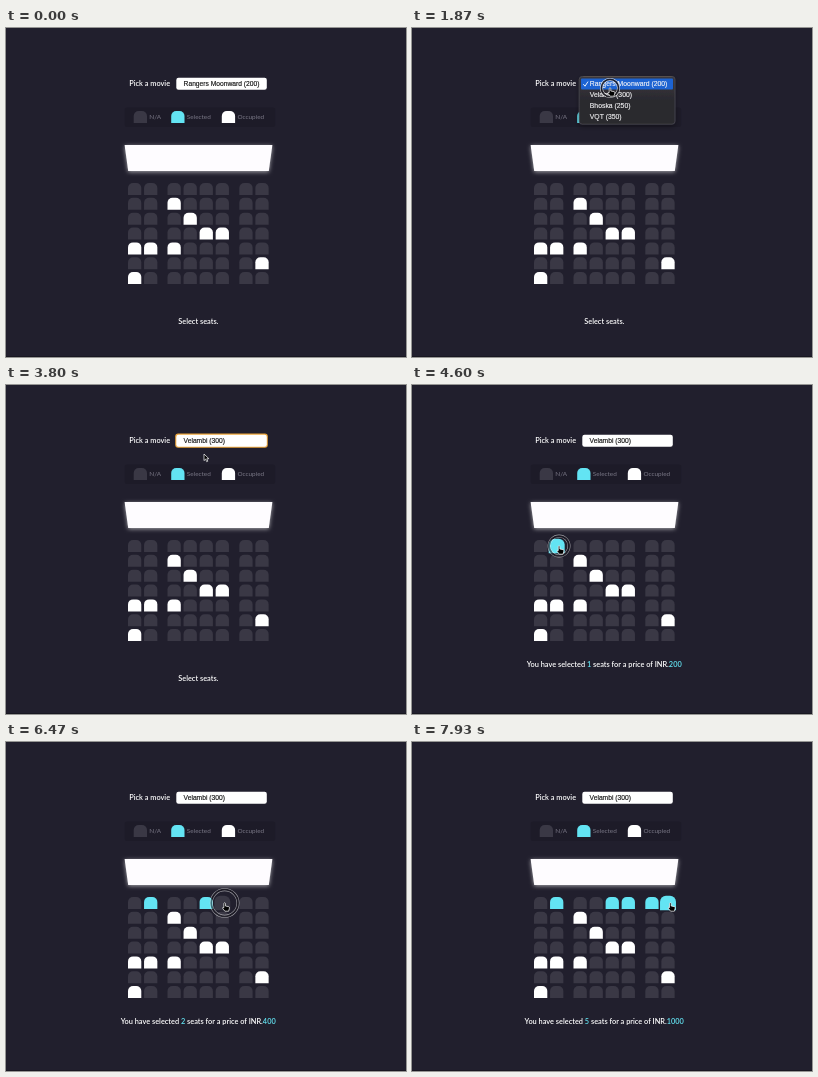
Write an HTML page that moves like this. It is 400 px wide and 329 px high and loops after 8 s.

```html
<!DOCTYPE html>
<html lang="en">
<head>
<meta charset="utf-8">
<title>Seat picker</title>
<style>
  html, body { margin: 0; width: 100%; height: 100%; overflow: hidden; background: #211f2d; }
  svg { display: block; width: 100vw; height: 100vh; }
  .lato { font: 600 7.38px Lato, sans-serif; fill: #fff; }
  .key { font: 6.4px Lato, sans-serif; fill: #7b7987; }
  .ui { font: 6.7px "Liberation Sans", Arial, sans-serif; fill: #111; stroke: #111; stroke-width: .14; }
  #menu .ui { font-size: 6.85px; fill: #f4f4f6; stroke: #f4f4f6; }
  .cyan { fill: #63e4f3; }
  .free { fill: #3a3845; }
  .picked { fill: #63e4f3; }
  .taken { fill: #fff; }
</style>
</head>
<body>
<svg viewBox="0 0 400 329" preserveAspectRatio="none">
  <defs>
    <path id="seat" d="M0 12V5a5 5 0 0 1 5-5H8.3a5 5 0 0 1 5 5V12Z"/>
    <filter id="glow" x="-20%" y="-60%" width="140%" height="220%">
      <feDropShadow dx="0" dy="1" stdDeviation="2.2" flood-color="#fff" flood-opacity=".6"/>
    </filter>
    <filter id="shade" x="-20%" y="-30%" width="140%" height="170%">
      <feDropShadow dx="0" dy="2" stdDeviation="2.5" flood-color="#000" flood-opacity=".35"/>
    </filter>
    <linearGradient id="glass" x2="0" y2="1">
      <stop stop-color="#3b393f"/>
      <stop offset=".5" stop-color="#2a292f"/>
    </linearGradient>
  </defs>
  <rect width="400" height="329" fill="#211f2d"/>
  <rect y="328" width="400" height="1" fill="#181721"/>

  <text class="lato" x="123.2" y="58.2">Pick a movie</text>
  <rect id="focus" x="169.2" y="48.6" width="92.6" height="14.2" rx="3" fill="#eda63c"/>
  <rect x="170.3" y="49.7" width="90.5" height="12.1" rx="2.2" fill="#fff"/>
  <text id="choice" class="ui" x="177.6" y="58.2"></text>

  <rect x="118.7" y="79.5" width="150.5" height="19.5" rx="2" fill="#1d1b28"/>
  <g id="legend"></g>

  <path d="M118.6 117H266.4L262.8 143H122.2Z" fill="#fefcff" filter="url(#glow)"/>
  <g id="seats"></g>

  <text id="hint" class="lato" x="192.3" y="295.7" text-anchor="middle">Select seats.</text>
  <text id="total" class="lato" x="192.2" y="281.7" text-anchor="middle">You have selected <tspan id="count" class="cyan"></tspan> seats for a price of INR.<tspan id="price" class="cyan"></tspan></text>

  <g id="menu">
    <rect x="167.2" y="48.4" width="95.8" height="47.8" rx="3" fill="url(#glass)" stroke="#55545c" stroke-width=".6" filter="url(#shade)"/>
    <rect id="bar" x="169" width="92" height="10.8" rx="1" fill="#1d63d2"/>
    <path d="M171.3 56.2L173 58.2L176 53.6" fill="none" stroke="#fff" stroke-width=".9"/>
  </g>

  <g id="ring" fill="none">
    <circle stroke="#fff" stroke-width="3"/>
    <circle stroke="#15141c" stroke-width="1.8"/>
  </g>
  <g id="cursor" fill="#000" stroke="#fff" stroke-width=".7" stroke-linejoin="round">
    <path id="arrow" d="M0 0V6.6L1.6 5.1L2.7 7.7L3.8 7.2L2.8 4.7H4.9Z"/>
    <path id="hand" d="M-.8 .3Q0 -.8 .8 .3V3L4.2 3.7Q5.1 4 4.8 5.2L4 8.2H.2L-2 5.3Q-2.2 4 -.8 4.6Z"/>
  </g>
</svg>
<script>
const LOOP = 8000;
const PRICE = 200;
const PRESS = 130; // a seat changes when the button is let go
const $ = id => document.getElementById(id);

function make(parent, tag, attrs, text = "") {
  const el = document.createElementNS("http://www.w3.org/2000/svg", tag);
  for (const k in attrs) el.setAttribute(k, attrs[k]);
  el.textContent = text;
  return parent.appendChild(el);
}
const show = (el, on) => { el.style.display = on ? "" : "none"; };
const clamp = v => Math.max(0, Math.min(1, v));
const inside = (p, x, y, w, h) => p.x >= x && p.x <= x + w && p.y >= y && p.y <= y + h;

const films = ["Rangers Moonward (200)", "Velambi (300)", "Bhoska (250)", "VQT (350)"];
films.forEach((name, i) => make($("menu"), "text", { class: "ui", x: 177.8, y: 58.4 + 11 * i }, name));

function legend(x, kind, label) {
  make($("legend"), "use", { href: "#seat", x, y: 83, class: kind });
  make($("legend"), "text", { class: "key", x: x + 15.6, y: 91.1 }, label);
}
legend(127.7, "free", "N/A");
legend(165.2, "picked", "Selected");
legend(215.8, "taken", "Occupied");

const columnX = c => 122 + 16.05 * c + (c > 1 ? 7.4 : 0) + (c > 5 ? 7.6 : 0);
const rowY = r => 155 + 14.85 * r;

// The pointer rests at each stop, and may press the button there
const stop = (from, to, x, y, click) => ({ from, to, x, y, click });
const pass = (t, x, y) => stop(t, t, x, y);
const sit = (from, to, col, click) =>
  ({ ...stop(from, to, columnX(col) + 9, rowY(0) + 6, click), col });

const stops = [
  stop(1530, 1950, 198, 60, 1800),
  pass(2220, 138, 221),
  stop(2600, 3800, 198, 69, 3330),
  pass(4080, 142, 202),
  sit(4330, 4600, 1, 4400),
  pass(5200, 209, 168),
  sit(5730, 6130, 4, 5870),
  sit(6330, 6720, 5, 6470),
  sit(6900, 7180, 6, 6930),
  pass(7390, 247, 90),
  sit(7550, LOOP, 7, 7560)
];

// One letter per seat, "x" is taken
const plan = "........ ..x..... ...x.... ....xx.. xxx..... .......x x.......".split(" ");
const seats = plan.flatMap((line, r) => [...line].map((mark, c) => {
  const visit = r === 0 && stops.find(s => s.col === c);
  return {
    el: make($("seats"), "use", { href: "#seat" }),
    x: columnX(c), y: rowY(r),
    isTaken: mark === "x",
    pickAt: visit ? visit.click + PRESS : Infinity
  };
}));

// A loop down over the seats and back to the select box
function wander(t) {
  const k = clamp((t - 200) / 1330);
  return {
    x: 198 - 62 * Math.sin(4 * Math.PI * k) * (1 - k / 2),
    y: 173 - 113 * Math.cos(2 * Math.PI * k)
  };
}

function pointer(t) {
  if (t < stops[0].from) return wander(t);
  const i = stops.findIndex(s => t <= s.to);
  const b = stops[i];
  if (t >= b.from) return b;
  const a = stops[i - 1];
  const k = (t - a.to) / (b.from - a.to);
  const e = k * k * (3 - 2 * k);
  return { x: a.x + (b.x - a.x) * e, y: a.y + (b.y - a.y) * e };
}

function drawRing(t, p) {
  const hit = stops.find(s => t >= s.click && t < s.click + 300);
  show($("ring"), hit);
  if (!hit) return;
  const age = t - hit.click;
  const shrink = clamp(age / 70);
  const out = clamp((age - 150) / 150);
  $("ring").setAttribute("transform", `translate(${p.x} ${p.y})`);
  $("ring").setAttribute("opacity", (0.55 + 0.3 * shrink) * (1 - out));
  for (const c of $("ring").children) c.setAttribute("r", 13.4 - 4.8 * shrink + 4 * out);
}

function draw(t) {
  const p = pointer(t);
  const visible = t >= 200;
  const open = t >= 1800 && t < 3700;
  let hand = t < 1960 && inside(p, 170, 49, 91, 13);

  show($("menu"), open);
  $("menu").setAttribute("opacity", 1 - clamp((t - 3530) / 170));
  show($("bar"), inside(p, 169, 50.8, 92, 43.9));
  $("bar").setAttribute("y", 50.6 + 11 * Math.floor((p.y - 50.8) / 11));
  show($("focus"), t >= 1800 && t < 4400);
  $("choice").textContent = films[t < 3530 ? 0 : 1];

  let count = 0;
  for (const s of seats) {
    const picked = t >= s.pickAt;
    const hover = visible && !open && !s.isTaken && inside(p, s.x, s.y, 13.3, 12);
    if (picked) count++;
    if (hover) hand = true;
    s.el.setAttribute("class", s.isTaken ? "taken" : picked ? "picked" : "free");
    s.el.setAttribute("transform", hover
      ? `translate(${s.x - 1.33} ${s.y - 1.2}) scale(1.2)`
      : `translate(${s.x} ${s.y})`);
  }

  show($("hint"), !count);
  show($("total"), count);
  $("count").textContent = count;
  $("price").textContent = count * PRICE;

  show($("cursor"), visible);
  show($("hand"), hand);
  show($("arrow"), !hand);
  $("cursor").setAttribute("transform", `translate(${p.x} ${p.y})`);
  drawRing(t, p);
}

const begin = performance.now();
function tick() {
  draw((performance.now() - begin) % LOOP);
  requestAnimationFrame(tick);
}
tick();
</script>
</body>
</html>
```
